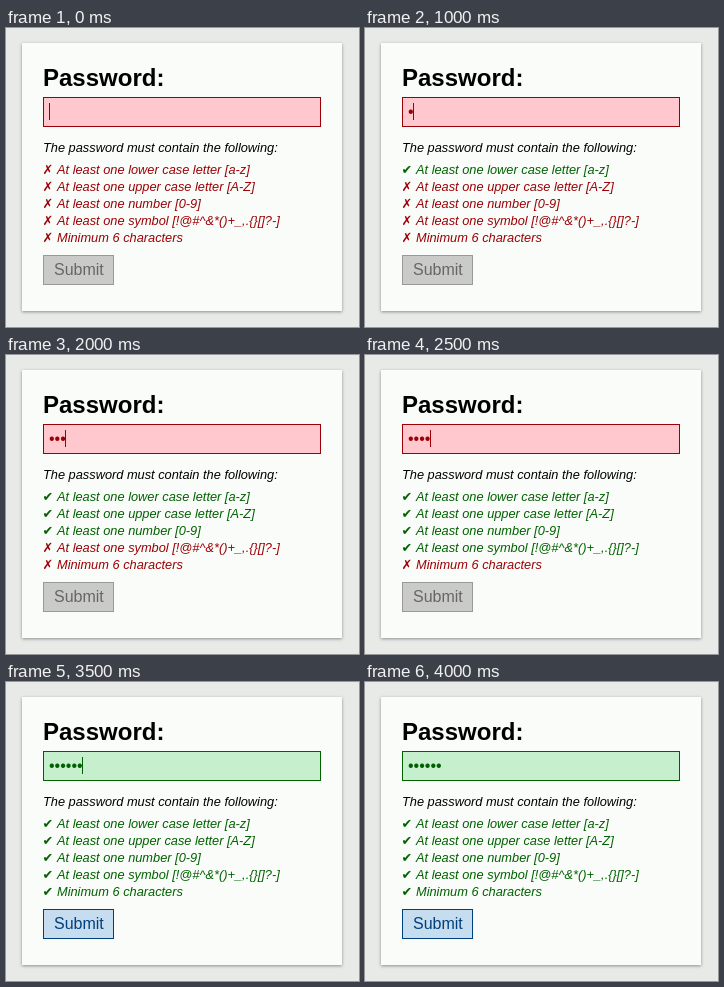
Write an HTML page with a canvas that moves like this. It is 353x299 px and loops after 4.5 s.

```html
<!DOCTYPE html>
<html lang="en">
<head>
<meta charset="utf-8">
<title>Password check</title>
<style>
html, body { margin: 0; width: 100%; height: 100%; overflow: hidden; background: #e8eae8; }
canvas { display: block; }
</style>
</head>
<body>
<canvas id="stage" width="353" height="299"></canvas>
<script>
const ctx = document.getElementById('stage').getContext('2d');
const LOOP = 4500, STEP = 500, FIRST_KEY = 1000, LENGTH = 6, CARET_OFF = 4000;
const SANS = 'Arial, "Liberation Sans", sans-serif';
const BAD = { ink: '#9c0006', fill: '#ffc7ce' };
const GOOD = { ink: '#006100', fill: '#c6efce' };
const OFF = { ink: '#666666', line: '#999999', fill: '#cacbc9' };
const ON = { ink: '#003f7d', line: '#003f7d', fill: '#c6dcef' };

// each rule is met once this many characters are typed
const RULES = [
  ['At least one lower case letter [a-z]', 1],
  ['At least one upper case letter [A-Z]', 2],
  ['At least one number [0-9]', 3],
  ['At least one symbol [!@#^&*()+_,.{}[]?-]', 4],
  ['Minimum 6 characters', LENGTH]
];

function text(str, x, y, font, color) {
  ctx.font = font;
  ctx.fillStyle = color;
  ctx.fillText(str, x, y);
}

function box(x, y, w, h, fill, line) {
  ctx.fillStyle = line;
  ctx.fillRect(x, y, w, h);
  ctx.fillStyle = fill;
  ctx.fillRect(x + 1, y + 1, w - 2, h - 2);
}

function card() {
  ctx.fillStyle = '#e8eae8';
  ctx.fillRect(0, 0, 353, 299);
  ctx.save();
  ctx.shadowColor = 'rgba(0, 0, 0, 0.4)';
  ctx.shadowBlur = 3;
  ctx.shadowOffsetY = 1;
  ctx.fillStyle = '#f9fcf8';
  ctx.fillRect(16, 15, 320, 268);
  ctx.restore();
}

function field(typed, caret) {
  const look = typed < LENGTH ? BAD : GOOD;
  box(37, 69, 278, 30, look.fill, look.ink);
  const dots = '\u2022'.repeat(typed);
  text(dots, 43, 89, '16px ' + SANS, look.ink);
  if (caret) ctx.fillRect(Math.floor(43 + ctx.measureText(dots).width), 75, 1, 17);
}

function rule([label, need], i, typed) {
  const met = typed >= need;
  const color = (met ? GOOD : BAD).ink;
  const y = 146 + i * 17;
  text(met ? '\u2714' : '\u2717', 36.5, y, 'italic 12.8px "DejaVu Sans", sans-serif', color);
  text(label, 51, y, 'italic 12.8px ' + SANS, color);
}

function draw(t) {
  const typed = Math.max(0, Math.min(LENGTH, Math.floor((t - FIRST_KEY) / STEP) + 1));
  card();
  text('Password:', 37, 58, 'bold 24px ' + SANS, '#000');
  field(typed, t < CARET_OFF);
  text('The password must contain the following:', 37, 124, 'italic 12.8px ' + SANS, '#000');
  RULES.forEach((r, i) => rule(r, i, typed));
  const button = typed < LENGTH ? OFF : ON;
  box(37, 227, 71, 30, button.fill, button.line);
  text('Submit', 48, 247, '16px ' + SANS, button.ink);
}

const start = performance.now();
function tick() {
  draw((performance.now() - start) % LOOP);
  requestAnimationFrame(tick);
}
tick();
</script>
</body>
</html>
```
